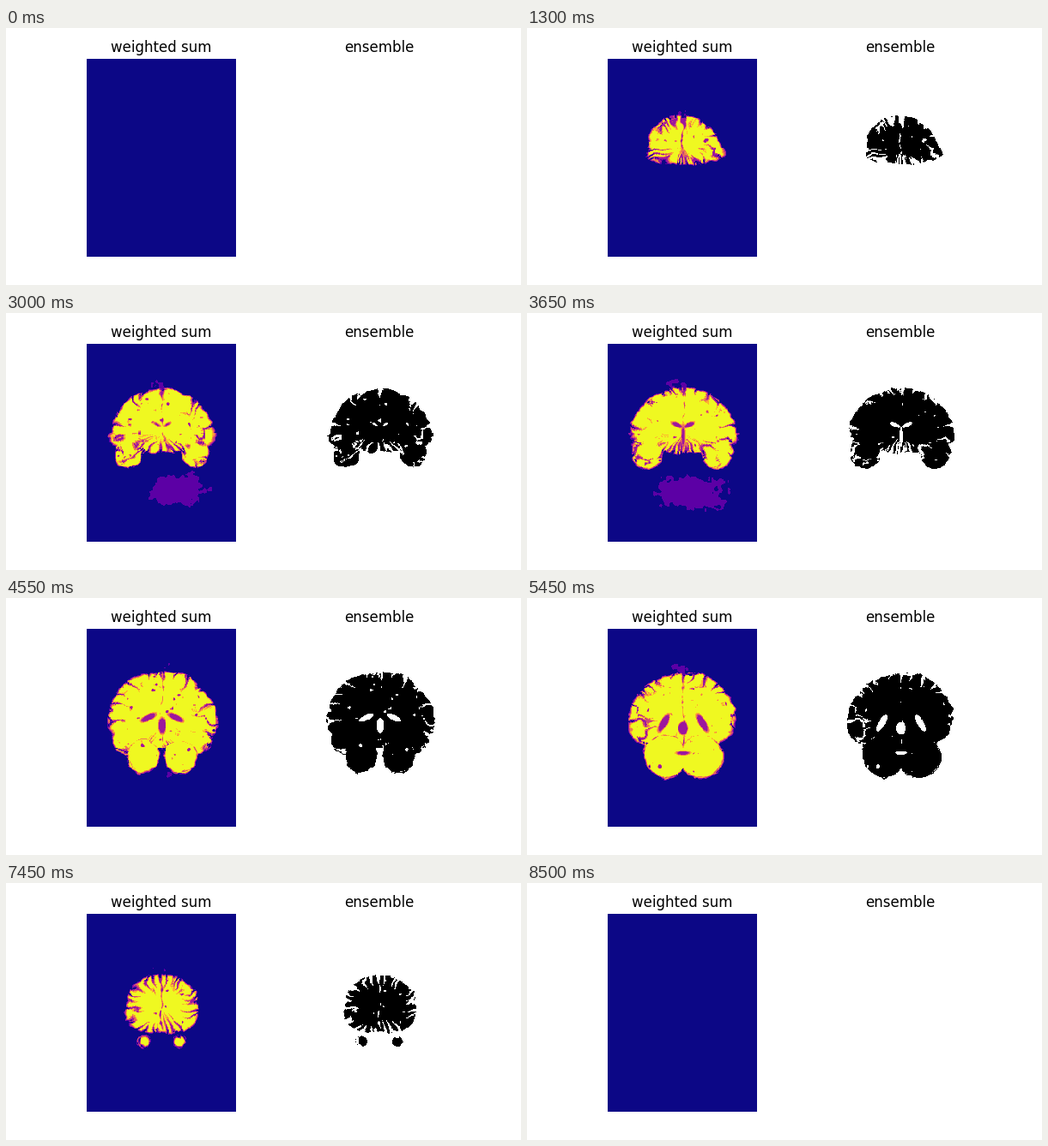
A matplotlib script for the animation above (8550 ms loop, 600 px wide and 300 px high).

```python
import numpy as np
import matplotlib.pyplot as plt
from matplotlib.animation import FuncAnimation

FRAMES, STEP = 171, 50
ROWS, COLS = 256, 192
CELL = 231 / ROWS
rng = np.random.default_rng(7)

# stage pixel coordinates of the image cells
X, Y = np.meshgrid(94 + (np.arange(COLS) + .5) * CELL,
                   36 + (np.arange(ROWS) + .5) * CELL)
IX, IY = X.astype(int) % 128, Y.astype(int) % 128


def noise(shape, sizes):
    """Smooth periodic noise with unit deviation."""
    spec = np.fft.rfftn(rng.normal(size=shape))
    for axis, (n, size) in enumerate(zip(shape, sizes)):
        k = np.fft.rfftfreq(n) if axis == 2 else np.fft.fftfreq(n)
        dims = [1, 1, 1]
        dims[axis] = -1
        spec *= np.exp(-2 * (np.pi * k * size) ** 2).reshape(dims)
    out = np.fft.irfftn(spec, s=shape, axes=(0, 1, 2))
    return out / out.std()


# polar noise for the folds, flat noise for everything else
FOLDS = noise((FRAMES, 64, 256), (5, 3, 3))
SLOPE = np.abs(np.gradient(FOLDS, axis=2)) + .08
GATE = noise((FRAMES, 64, 256), (6, 4, 5))
WARP = noise((FRAMES, 128, 128), (6, 4, 4))
GRAIN = noise((FRAMES, 128, 128), (2, 1.5, 1.5))


def ease(t, a, b):
    p = np.clip((t - a) / (b - a), 0, 1)
    return p * p * (3 - 2 * p)


def window(t, a, b):
    return ease(t, a, a + .4) * ease(-t, -b, .4 - b)


def dome(t, start, peak, end):
    """Round rise and fall, like slicing through a ball."""
    u = (t - peak) / (end - peak if t > peak else peak - start)
    return np.sqrt(max(0, 1 - u * u))


def ellipse(dx, dy, rx, ry, tilt=0, power=2):
    """Approximate depth inside an ellipse, in pixels."""
    c, s = np.cos(np.radians(tilt)), np.sin(np.radians(tilt))
    u, v = np.abs(dx * c + dy * s) / rx, np.abs(dy * c - dx * s) / ry
    return (1 - (u ** power + v ** power) ** (1 / power)) * min(rx, ry)


def cavities(side, t):
    """Depth inside the ventricles, which drift apart towards the back."""
    p = ease(t, 3.4, 5.4)
    lateral = ellipse(side - 6 - 16.5 * p, Y - 130 - 16 * p, 6 + 5 * p,
                      2.2 + 1.6 * p, -28 + 88 * p) - 6 * (1 - window(t, 2.7, 6.1))
    middle = ellipse(side, Y - 144 - 8 * p, 1.5 + 4 * p,
                     12 - 5 * p) - 7 * (1 - window(t, 2.8, 6))
    fourth = ellipse(side, Y - 181, 7, 2.2) - 5 * (1 - window(t, 4.8, 6))
    return np.maximum(np.maximum(lateral, middle), fourth)


def stray_votes(t, top, rough):
    """Faint votes above the head and, for a while, in the neck."""
    p = ease(t, 2.2, 3.5)
    neck = ellipse(X - 211 + 21 * p, Y - 202 - 7 * p, 11 + 28 * p, 14 + 5 * p,
                   -20 * (1 - p), 3) - 25 * (1 - window(t, 1.8, 4.7))
    crown = ellipse(X - 179, Y - top + 4, 7, 3)
    return np.maximum(neck, crown) + 2 * rough > 1


def slice_at(i):
    t = i * STEP / 1000
    size = dome(t, .03, 4.6, 8.5)
    if size == 0:
        return np.zeros(X.shape), np.zeros(X.shape)
    cx = 181.5
    cy = 140 + 12 * max(0, (t - 4.6) / 3.9) ** 3
    dx, dy = X - cx, Y - cy
    side, r = np.abs(dx), np.hypot(dx, dy)
    warp, grain = WARP[i, IY, IX], GRAIN[i, IY, IX]
    turn = ((np.arctan2(dx, -dy) + .05 * warp) / (2 * np.pi) * 256).astype(int) % 256
    ring = (r * .4).astype(int) % 64
    gate = GATE[i, ring, turn]

    # cerebrum, temporal lobes and cerebellum
    wide, high = 61.5 * size, 54 * size
    low = (22 + 14 * ease(t, 3.5, 4.6)) * np.sqrt(size)
    edge = np.where(dy < 0, ellipse(dx, dy, wide, high),
                    ellipse(dx, dy, wide, low, power=3))
    g = ease(t, 1.5, 3.7)
    lobes = ellipse(side - 32 - 8 * g, Y - 167 + 4 * g, 8 + 10 * g,
                    9 + 11 * g) - 22 * (1 - window(t, 1.6, 5.2))
    hind = ellipse(side - 21, Y - 185, 25, 25) - 28 * (1 - dome(t, 4.1, 5.3, 7.6))
    edge = np.maximum(np.maximum(edge, lobes), hind) + 1.1 * gate + .4 * grain

    # folds cut in from the rim and close further inside
    reach = np.clip(10 + 5 * gate, 4, 18)
    fold = np.abs(FOLDS[i, ring, turn]) / SLOPE[i, ring, turn] * r / 41
    cut = fold - 1.8 * (1 - edge / reach)
    s = np.minimum(edge, 2 * (2.6 - grain))

    # midline, deepest at the crown and open near both poles
    notch = 2.2 * np.clip(1 - (dy + high) / 16, 0, 1)
    gap = np.abs(dx - warp) - notch - (1.8 - 2.4 * size) - .5 * grain
    s = np.where(hind < 0, np.minimum(s, np.minimum(cut, gap)), s)
    border = np.abs(hind + .6 * warp) + .6 - 1.6 * ease(t, 5, 6.4) - .4 * grain
    s = np.minimum(s, np.minimum(border, -cavities(side, t)))

    votes = np.clip(.55 + .42 * s, 0, 1)
    votes = np.where(edge > 3, np.maximum(votes, .3), votes)
    faint = stray_votes(t, cy - high, grain + warp)
    votes = np.where(faint, np.maximum(votes, .19), votes)
    return np.round(votes * 6) / 6, (s > 0).astype(float)


fig, axes = plt.subplots(1, 2, figsize=(6, 3), dpi=100)
images = []
for ax, title, cmap in zip(axes, ("weighted sum", "ensemble"),
                           ("plasma", "binary")):
    ax.set_title(title)
    ax.axis("off")
    images.append(ax.imshow(np.zeros(X.shape), cmap=cmap, vmin=0, vmax=1,
                            interpolation="nearest"))


def draw(i):
    for image, data in zip(images, slice_at(i)):
        image.set_data(data)
    return images


anim = FuncAnimation(fig, draw, frames=FRAMES, interval=STEP, repeat=True,
                     repeat_delay=0)
plt.show()
```
